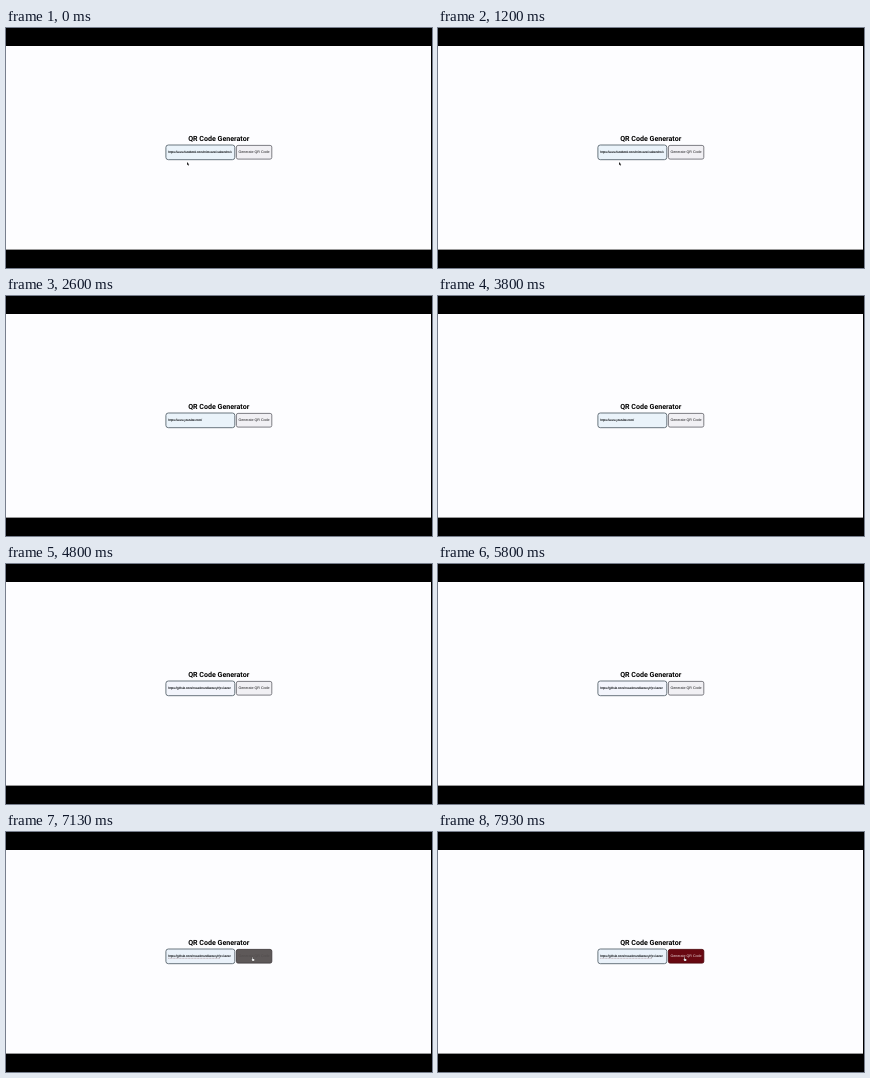
An HTML page that plays this animation: 426x240 px, repeating every 8000 ms.

```html
<!DOCTYPE html>
<html lang="en">
<head>
<meta charset="utf-8">
<title>QR Code Generator</title>
<style>
  html, body { margin: 0; width: 100%; height: 100%; overflow: hidden; background: #000; }
  svg { display: block; width: 100%; height: 100%; }
  text { font-family: "Liberation Sans", Arial, sans-serif; text-rendering: geometricPrecision; }
  #title { font: 700 7.1px Roboto, sans-serif; }
  #url { stroke: #202428; stroke-width: .12; }
</style>
</head>
<body>
<svg viewBox="0 0 426 240">
  <defs>
    <clipPath id="inside"><rect x="161.5" y="118" width="65.7" height="13"/></clipPath>
  </defs>
  <rect width="426" height="240" fill="#000"/>
  <rect y="18" width="425" height="203.6" fill="#fdfdff"/>
  <text id="title" x="212.7" y="112.5" text-anchor="middle" fill="#000">QR Code Generator</text>

  <rect id="field" x="159.9" y="117" width="68.9" height="14.7" rx="2.4" stroke="#5b6770" stroke-width=".9"/>
  <g clip-path="url(#inside)">
    <text id="url" x="162.2" y="125.3" font-size="2.97" fill="#202428"></text>
    <path id="spelling" d="M162.2 126.3H214" stroke="#8c6c72" stroke-width=".5" stroke-dasharray="1 .5"/>
  </g>

  <rect id="button" x="230.4" y="117.4" width="35.4" height="13.7" rx="1.7" stroke-width=".9"/>
  <text id="label" x="248" y="125.3" font-size="3.62" text-anchor="middle">Generate QR Code</text>

  <path id="arrow" d="M181 133.9V137.3L181.8 136.6L182.4 137.8L182.9 137.5L182.4 136.4H183.3Z" fill="#222"/>
  <path id="hand" d="M246.1 125.3V127.4L245.3 127L246.3 129H248.2L248.5 127.2L246.8 126.7V125.3Z" fill="#fff" stroke="#222" stroke-width=".2"/>
</svg>
<script>
const LOOP = 8000;
const HOVER_AT = 7000;
const pages = [
  { from: 0, url: "https://www.facebook.com/mirovanel.sabendro.k", fill: "#eaf3fa" },
  { from: 1900, url: "https://www.youtube.com/", fill: "#eaf3fa" },
  { from: 4800, url: "https://github.com/mavelorandisetany/Qr-Gener", fill: "#f3f5fc" },
  { from: HOVER_AT, url: "https://github.com/mavelorandisetany/Qr-Gener", fill: "#eaf2fa" }
];
const hoverTimes = [0, 130, 400];
const buttonColors = [[241, 240, 244], [94, 89, 89], [104, 8, 17]];
const labelColors = [[20, 20, 22], [80, 76, 76], [240, 226, 228]];
const borderColors = [[112, 112, 118], [65, 60, 62], [80, 8, 14]];

const part = id => document.getElementById(id);
const show = (id, visible) => part(id).setAttribute("visibility", visible ? "visible" : "hidden");

function blend(colors, age) {
  const t = Math.max(0, Math.min(age, hoverTimes[2]));
  const i = t < hoverTimes[1] ? 0 : 1;
  const k = (t - hoverTimes[i]) / (hoverTimes[i + 1] - hoverTimes[i]);
  return `rgb(${colors[i].map((c, n) => Math.round(c + (colors[i + 1][n] - c) * k))})`;
}

function draw(now) {
  const t = now % LOOP;
  const page = pages.filter(p => p.from <= t).pop();
  const age = t - HOVER_AT;
  part("url").textContent = page.url;
  part("field").setAttribute("fill", page.fill);
  part("button").setAttribute("fill", blend(buttonColors, age));
  part("button").setAttribute("stroke", blend(borderColors, age));
  part("label").setAttribute("fill", blend(labelColors, age));
  show("arrow", t < pages[1].from);
  show("hand", age >= 0);
  show("spelling", age >= 0);
  requestAnimationFrame(() => draw(performance.now()));
}
draw(0);
</script>
</body>
</html>
```
